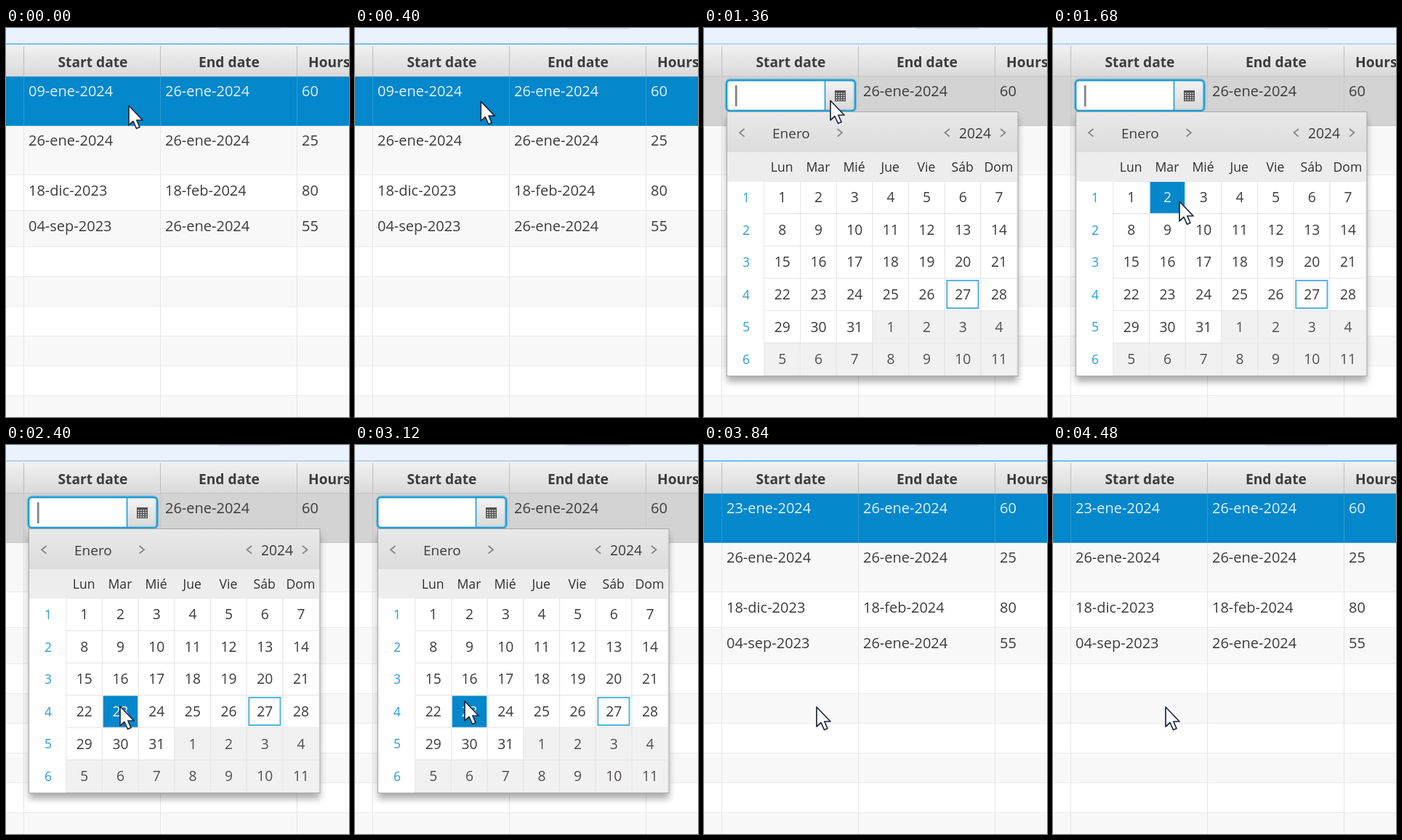
An HTML page that plays this animation: 472 px wide and 536 px high, repeating every 4560 ms.

```html
<!DOCTYPE html>
<html lang="es">
<head>
<meta charset="utf-8">
<title>Date picker in a table</title>
<style>
  html, body { margin: 0; width: 100%; height: 100%; overflow: hidden; background: #fff; }
  svg { display: block; width: 472px; height: 536px; }
  text { font-family: "Open Sans", "Noto Sans", sans-serif; font-size: 20px; fill: #3c3c3c; }
  .head { font-size: 19.2px; font-weight: 700; fill: #3c3c3c; }
  .mid { text-anchor: middle; }
  .week { font-size: 17.5px; fill: #2a9dd4; }
  .weekday { font-size: 17.6px; fill: #303030; }
  .day { font-size: 19.3px; }
</style>
</head>
<body>
<svg id="stage" viewBox="0 0 472 536">
  <defs>
    <linearGradient id="headFill" x2="0" y2="1">
      <stop stop-color="#f1f1f1"/><stop offset="1" stop-color="#d9d9d9"/>
    </linearGradient>
    <linearGradient id="buttonFill" x2="0" y2="1">
      <stop stop-color="#f4f4f4"/><stop offset="1" stop-color="#d8d8d8"/>
    </linearGradient>
    <linearGradient id="monthFill" x2="0" y2="1">
      <stop stop-color="#e9e9e9"/><stop offset="1" stop-color="#dcdcdc"/>
    </linearGradient>
    <filter id="shadow" x="-10%" y="-10%" width="120%" height="120%">
      <feDropShadow dx="0" dy="8" stdDeviation="5" flood-color="#000" flood-opacity=".32"/>
    </filter>
  </defs>
</svg>
<script>
const LOOP = 4560, STEP = 80;
const EDIT = 640, OPEN = 1280, CLOSE = 3760, BLINK = 500;
const COLS = [24.5, 212.5, 400.5];
const CELL = { x: 82.8, y: 211.3, w: 49.7, h: 44.55 };
const TODAY = 26;

const rect = (x, y, w, h, fill, more = '') =>
  `<rect x="${x}" y="${y}" width="${w}" height="${h}" fill="${fill}" ${more}/>`;
const text = (x, y, s, cls = '', more = '') =>
  `<text x="${x}" y="${y}" class="${cls}" ${more}>${s}</text>`;
const line = (d, color, width = 1) =>
  `<path d="${d}" fill="none" stroke="${color}" stroke-width="${width}"/>`;
const repeat = (n, draw) => Array.from({ length: n }, (_, i) => draw(i)).join('');

function table() {
  const tops = [67, 135, 203, 252, 302, 343, 384, 425, 466, 507, 548];
  const rows = [
    ['26-ene-2024', '26-ene-2024', '25', 162],
    ['18-dic-2023', '18-feb-2024', '80', 230.5],
    ['04-sep-2023', '26-ene-2024', '55', 280]
  ];
  return rect(0, 0, 472, 22, '#eaf2fd')
    + rect(292, 0, 86, 1.2, '#cfd4e6')
    + rect(0, 24, 472, 43, 'url(#headFill)')
    + rect(0, 66, 472, 1, '#c4c4c4')
    + line(COLS.map(x => `M${x} 25V66`).join(''), '#bdbdbd')
    + text(71.5, 54, 'Start date', 'head') + text(265, 54, 'End date', 'head')
    + text(416, 54, 'Hours', 'head')
    + repeat(10, i => rect(0, tops[i], 472, tops[i + 1] - tops[i], i % 2 ? '#f8f8f8' : '#fff')
      + rect(0, tops[i + 1] - 1, 472, 1, '#ebebeb'))
    + line(COLS.map(x => `M${x} 67V536`).join(''), '#e6e6e6')
    + rows.map(([start, end, hours, y]) =>
      text(31, y, start) + text(219, y, end) + text(407, y, hours)).join('');
}

function selectedRow() {
  return rect(0, 21, 472, 2.2, '', 'id="focusLine"')
    + rect(0, 67, 472, 67.5, '', 'id="row"')
    + `<path id="rowLines" d="${COLS.map(x => `M${x} 67V134`).join('')}M0 134.5H472"/>`
    + `<g id="rowText">${text(31, 94, '', '', 'id="start"')}`
    + text(219, 94, '26-ene-2024') + text(407, 94, '60') + '</g>';
}

function field() {
  const icon = rect(180, 86, 15, 15, '#505050')
    + repeat(4, r => repeat(4, c =>
      rect(181.4 + c * 3.4, 89.2 + r * 3, 2, 1.7, '#d6d6d6')));
  return `<g id="field">
    <rect x="31" y="71.5" width="177" height="43" rx="5" fill="#fff" stroke="#b5bcc2"/>
    <path d="M166.5 72H203a5 5 0 0 1 5 5V109a5 5 0 0 1-5 5H166.5Z" fill="url(#buttonFill)" stroke="#b4b4b4"/>
    ${icon}
    <g id="focusRing" fill="none" stroke="#1d9dd4">
      <rect x="31" y="71.8" width="177" height="42.4" rx="5" stroke-width="5" stroke-opacity=".3"/>
      <rect x="31" y="71.8" width="177" height="42.4" rx="5" stroke-width="2.2"/>
      <path d="M166.5 72V114" stroke-width="1.6"/>
    </g>
    ${rect(42.8, 79, 2.8, 29, '#858585', 'id="caret"')}</g>`;
}

function cellPos(i) {
  return { x: CELL.x + i % 7 * CELL.w, y: CELL.y + Math.floor(i / 7) * CELL.h };
}

function popup() {
  const arrow = (x, dir) => line(`M${x - 3 * dir} 139L${x + 3.5 * dir} 144.3L${x - 3 * dir} 149.6`, '#858585', 1.8);
  const days = repeat(42, i => {
    const { x, y } = cellPos(i), other = i > 30;
    return rect(x, y, CELL.w, CELL.h, other ? '#f1f1f1' : '#fff', 'stroke="#e6e6e6"')
      + (i === TODAY ? rect(x + 3, y + 3, CELL.w - 6.5, CELL.h - 6.5, 'none', 'stroke="#58b2da" stroke-width="2"') : '')
      + text(x + 25, y + 29, i % 31 + 1, 'day mid', other ? 'style="fill:#54504e"' : '');
  });
  return `<g id="popup">
    ${rect(31.5, 116, 400.5, 363.5, '#fff', 'filter="url(#shadow)"')}
    ${rect(32, 116, 400, 55.5, 'url(#monthFill)')}
    ${rect(32, 171.5, 400, 40, '#ededed')}
    ${arrow(52.5, -1)}${arrow(186.5, 1)}${arrow(335, -1)}${arrow(411, 1)}
    ${text(94, 151.5, 'Enero', '', 'style="font-size:19px"')}
    ${text(351, 151.5, '2024', '', 'style="font-size:19.3px"')}
    ${['Lun', 'Mar', 'Mié', 'Jue', 'Vie', 'Sáb', 'Dom'].map((d, i) =>
      text(107.2 + i * 49.7, 197.8, d, 'weekday mid')).join('')}
    ${repeat(6, i => text(58, 240 + i * CELL.h, i + 1, 'week mid'))}
    ${days}
    <g id="hover">${rect(1.2, .7, CELL.w - 2.2, CELL.h - 1.4, '#0487cb')}
      ${text(25, 29, '', 'day mid', 'id="hoverDay" style="fill:#e4f4fd"')}</g>
    ${rect(31.5, 115.5, 400.5, 364, 'none', 'stroke="#a8a8a8"')}</g>`;
}

const pointer = `<path id="pointer" d="M0 0V27L6 21.5L10.5 31.5L15 29.5L10.8 20H19Z"
  fill="#fff" stroke="#20283c" stroke-width="1.7" stroke-linejoin="round"/>`;

const stage = document.getElementById('stage');
stage.insertAdjacentHTML('beforeend', table() + selectedRow() + field() + popup() + pointer);

const $ = id => document.getElementById(id);
const show = (id, on) => $(id).setAttribute('display', on ? 'inline' : 'none');
const attr = (id, name, value) => $(id).setAttribute(name, value);

// Pointer stops: time, x, y
const path = [
  [0, 169, 107], [160, 169, 107], [480, 174, 100], [1360, 174, 100],
  [1680, 174, 239], [1760, 174, 239], [2240, 157, 360], [2480, 157, 360],
  [2880, 151, 353], [3200, 151, 353], [3520, 155, 361], [LOOP, 155, 361]
];

function pointerAt(t) {
  const i = path.findIndex(p => p[0] > t);
  const [t0, x0, y0] = path[i - 1], [t1, x1, y1] = path[i];
  const u = (t - t0) / (t1 - t0), k = u * u * (3 - 2 * u);
  return [x0 + (x1 - x0) * k, y0 + (y1 - y0) * k];
}

function render(time) {
  const t = Math.floor(time % LOOP / STEP) * STEP;
  const open = t >= OPEN && t < CLOSE;
  const [x, y] = pointerAt(t);

  attr('focusLine', 'fill', open ? '#b4d2ee' : '#78c0e8');
  attr('row', 'fill', open ? '#d3d3d3' : '#0487cb');
  attr('rowLines', 'stroke', open ? '#c8c8c8' : '#2b9bd3');
  $('rowText').querySelectorAll('text').forEach(e => e.style.fill = open ? '#3c3c3c' : '#e0f2fc');
  $('start').textContent = t < EDIT ? '09-ene-2024' : t < CLOSE ? '' : '23-ene-2024';

  show('field', t >= EDIT && t < CLOSE);
  show('focusRing', open);
  show('caret', open && Math.floor((t - OPEN) / BLINK) % 2 === 0);
  show('popup', open);

  const col = Math.floor((x - CELL.x) / CELL.w), row = Math.floor((y - CELL.y) / CELL.h);
  show('hover', open && row >= 0);
  if (row >= 0) {
    const i = row * 7 + col, cell = cellPos(i);
    attr('hover', 'transform', `translate(${cell.x} ${cell.y})`);
    $('hoverDay').textContent = i % 31 + 1;
  }
  attr('pointer', 'transform', `translate(${x} ${y})`);
}

const began = performance.now();
function tick() {
  render(performance.now() - began);
  requestAnimationFrame(tick);
}
tick();
</script>
</body>
</html>
```
